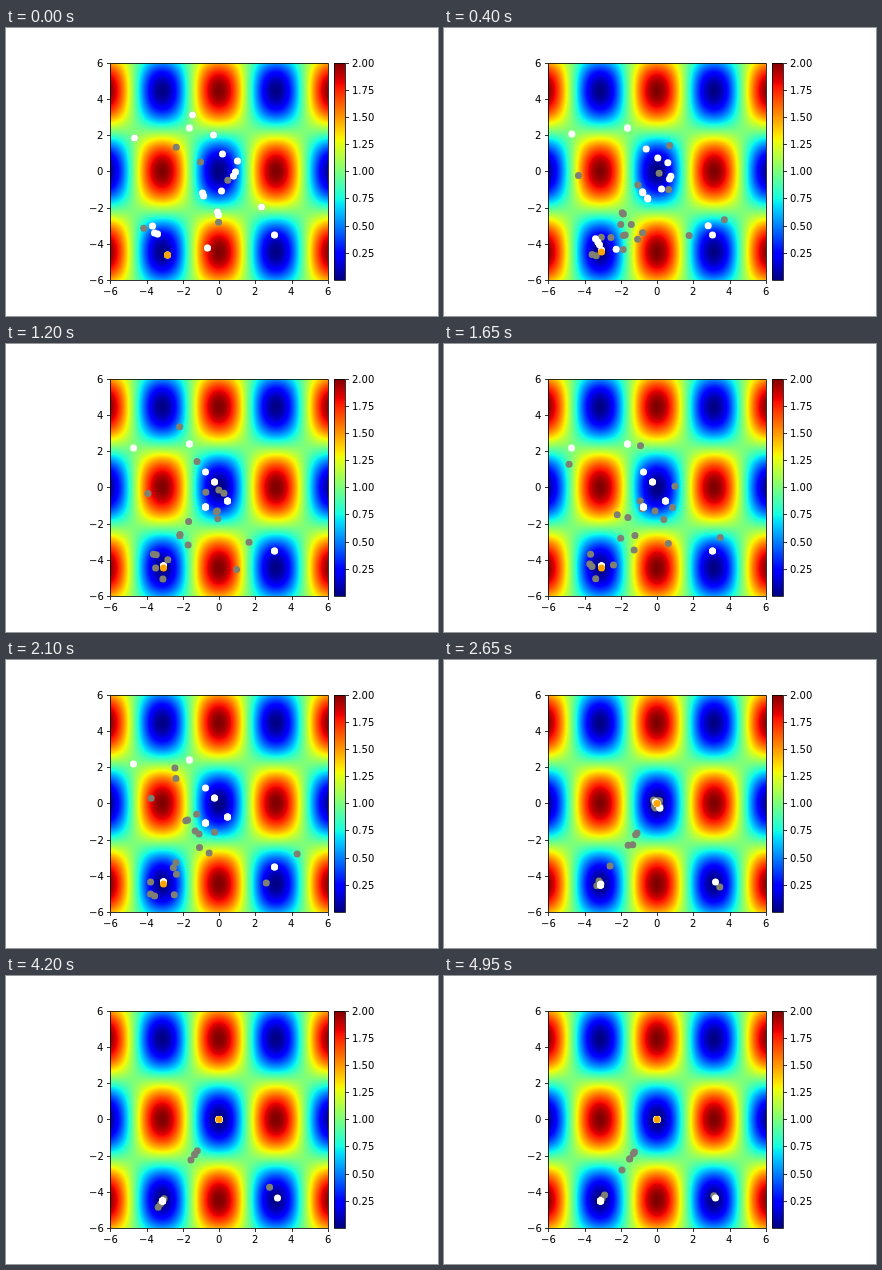
Write an HTML page with a canvas that moves like this. It is 432x288 px and loops after 5000 ms.

```html
<!DOCTYPE html>
<html lang="en">
<head>
<meta charset="utf-8">
<title>Particle swarm</title>
<style>
  html, body { margin: 0; width: 100%; height: 100%; overflow: hidden; background: #fff; }
  canvas, svg { position: absolute; left: 0; top: 0; display: block; }
  text { font: 10px "DejaVu Sans", sans-serif; fill: #000; }
</style>
</head>
<body>
<canvas id="field" width="432" height="288"></canvas>
<svg id="plot" width="432" height="288" viewBox="0 0 432 288"></svg>
<script>
const LOOP = 5000, STEP = 50;
const LEFT = 104.4, TOP = 34.56, SIZE = 217.44, BAR = 328.4, BAR_W = 10.9;
const RIGHT = LEFT + SIZE, BOTTOM = TOP + SIZE, UNIT = SIZE / 12;
const clamp = v => Math.max(0, Math.min(1, v));
const snap = v => Math.round(v) + 0.5;

// ---------- heat map ----------
const jet = v => [
  v < 0.89 ? (v - 0.35) / 0.31 : 1 - (v - 0.89) / 0.22,
  v < 0.5 ? (v - 0.125) / 0.25 : (0.91 - v) / 0.27,
  v < 0.11 ? 0.5 + v / 0.22 : (0.65 - v) / 0.31
].map(c => Math.round(255 * clamp(c)));

const griewank = (x, y) =>
  1 + (x * x + y * y) / 4000 - Math.cos(x) * Math.cos(y / Math.SQRT2);

const ctx = document.getElementById("field").getContext("2d");
function paint(from, to, value) {
  const x0 = Math.round(from), y0 = Math.round(TOP);
  const img = ctx.createImageData(Math.round(to) - x0, Math.round(BOTTOM) - y0);
  for (let n = 0; n < img.width * img.height; n++) {
    const x = x0 + n % img.width + 0.5, y = y0 + Math.floor(n / img.width) + 0.5;
    img.data.set([...jet(clamp(value(x, y))), 255], 4 * n);
  }
  ctx.putImageData(img, x0, y0);
}
paint(LEFT, RIGHT, (x, y) => griewank((x - LEFT) / UNIT - 6, 6 - (y - TOP) / UNIT) / 2);
paint(BAR, BAR + BAR_W, (x, y) => (BOTTOM - y) / SIZE);

// ---------- axes ----------
const svg = document.getElementById("plot");
function add(tag, attrs) {
  const el = document.createElementNS("http://www.w3.org/2000/svg", tag);
  for (const key in attrs) el.setAttribute(key, attrs[key]);
  return svg.appendChild(el);
}
const line = d => add("path", { d, fill: "none", stroke: "#000", "stroke-width": 0.8 });
const frame = (from, to) =>
  line(`M${snap(from)} ${snap(TOP)}H${snap(to)}V${snap(BOTTOM)}H${snap(from)}z`);

// align: 0 starts at x, 0.5 is centred, 1 ends at x; glyphs sit on whole pixels
function label(x, y, align, text) {
  const el = add("text", { y: Math.round(y) });
  el.textContent = text;
  el.setAttribute("x", Math.round(x - align * el.getComputedTextLength()));
}

const dots = (n, fill) => Array.from({ length: n }, () => add("circle", { r: 3.5, fill }));
const grays = dots(20, "#808072");
const whites = dots(20, "#fff");
const [gold] = dots(1, "#ffa500");

frame(LEFT, RIGHT);
frame(BAR, BAR + BAR_W);
for (let v = -6; v <= 6; v += 2) {
  const x = LEFT + (v + 6) * UNIT, y = TOP + (6 - v) * UNIT;
  const text = String(v).replace("-", "\u2212");
  line(`M${snap(x)} ${snap(BOTTOM)}v3.5`);
  line(`M${snap(LEFT)} ${snap(y)}h-3.5`);
  label(x, BOTTOM + 15, 0.5, text);
  label(LEFT - 7, y + 4, 1, text);
}
for (let v = 0.25; v <= 2; v += 0.25) {
  const y = BOTTOM - SIZE * v / 2;
  line(`M${snap(BAR + BAR_W)} ${snap(y)}h3.5`);
  label(BAR + BAR_W + 7, y + 4, 0, v.toFixed(2));
}

// ---------- swarm ----------
let seed = 7;
const rnd = () => (seed = (seed * 16807) % 2147483647) / 2147483647;
const mix = (a, b, f) => [a[0] + (b[0] - a[0]) * f, a[1] + (b[1] - a[1]) * f];
const dist = (a, b) => Math.hypot(a[0] - b[0], a[1] - b[1]);

// final minima; pull and swing say how far the leader drags a particle away
const HUB = { at: [212.5, 143.5], pull: 0.3, swing: 0.35 };
const SINK = { at: [156, 225], pull: 0.27, swing: 0.35 };
const SIDE = { at: [271, 222], pull: 0, swing: 0.14 };

// places where the particles rest before they settle
const rests = [[183, 100], [127, 104], [199, 128], [208, 138], [216, 153],
  [221, 157], [199, 163], [157, 222], [268, 207]];

const starts = [[183, 100], [186, 87], [128, 110], [207, 107], [216, 126],
  [231, 133], [229, 144], [227, 148], [215, 163], [196, 165], [197, 168],
  [211, 184], [212, 187], [255, 179], [268, 207], [146, 198], [148, 205],
  [151, 206], [201, 220], [161, 227]];

const swarm = starts.map((start, i) => ({
  start,
  rest: rests.reduce((a, b) => dist(b, start) < dist(a, start) ? b : a),
  home: start[0] < 190 ? SINK : start[0] > 260 ? SIDE : HUB,
  pace: 0.3 + 0.7 * rnd(),
  rate: 0.7 + 0.9 * rnd(),
  phase: 6.28 * rnd(),
  delay: i % 4 ? 4 : 0
}));

// a personal best improves in three sudden jumps
const jumps = (t, from, span, pace) =>
  Math.min(1, Math.floor(3 * clamp((t - from) / span) / pace) / 3);

function bestAt(p, t) {
  const early = mix(p.start, p.rest, jumps(t, 0, 800, p.pace));
  return mix(early, p.home.at, jumps(t, 2100, 650, p.pace));
}

function leaderAt(t) {
  if (t < 200) return starts[starts.length - 1];
  return t < 2400 ? [157, 224] : HUB.at;
}

// swings between the own best and the leader, with scatter that dies out
function nowAt(p, t) {
  const k = t / STEP, a = k * p.rate + p.phase;
  const awake = p.delay ? clamp(k / p.delay) : 1;
  const scatter = 13 * awake * clamp((2800 - t) / 700);
  const s = awake * clamp(0.3 + k / 4) * (p.home.pull + p.home.swing * Math.sin(a));
  const [x, y] = mix(bestAt(p, t), leaderAt(t), s);
  return [x + scatter * Math.cos(1.3 * a), y + scatter * Math.sin(0.8 * a + 2)];
}

function place(el, [x, y]) {
  el.setAttribute("cx", x + 0.5);
  el.setAttribute("cy", y);
}

function draw(ms) {
  const t = Math.floor((ms + 0.5) % LOOP / STEP) * STEP;
  swarm.forEach((p, i) => {
    place(grays[i], nowAt(p, t));
    place(whites[i], bestAt(p, t));
  });
  place(gold, leaderAt(t));
}

function tick() {
  draw(performance.now());
  requestAnimationFrame(tick);
}
tick();
</script>
</body>
</html>
```
